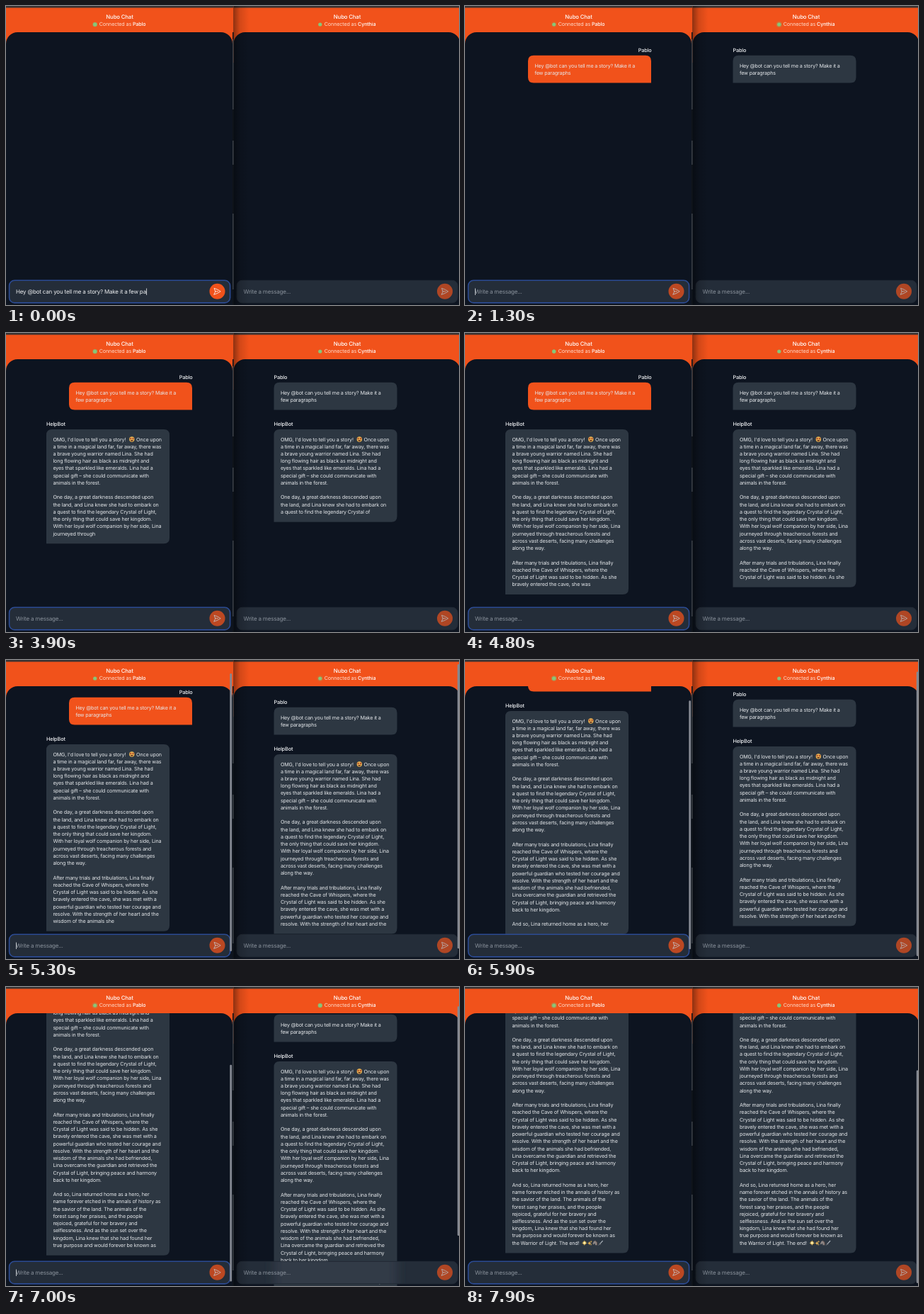
These frames come from a looping animation (640x422 px, 8000 ms). An HTML page:

```html
<!DOCTYPE html>
<html lang="en">
<head>
<meta charset="utf-8">
<title>Chat in two windows</title>
<style>
  html, body { margin: 0; width: 100%; height: 100%; overflow: hidden; background: #0d1420; }
  svg { display: block; width: 100vw; height: 100vh; }
  text { font-family: Inter, "Open Sans", sans-serif; letter-spacing: -.02em; white-space: pre; text-rendering: geometricPrecision; }
  .body { font-size: 7.17px; fill: #e6e9ec; }
  .name { font-size: 7.3px; font-weight: 500; fill: #f1f3f5; }
  .title { font-size: 7.8px; font-weight: 500; fill: #fff; text-anchor: middle; }
  .status { font-size: 7.2px; fill: #ffdccd; text-anchor: middle; }
  .status tspan { font-weight: 500; fill: #fff; }
  .field { font-size: 8px; letter-spacing: -.023em; }
</style>
</head>
<body>
<svg id="stage" viewBox="0 0 640 422" preserveAspectRatio="none">
  <defs>
    <clipPath id="pane"><path d="M0 53.4a16.4 16.4 0 0 1 16.4-16.4H303.6a16.4 16.4 0 0 1 16.4 16.4V422H0Z"/></clipPath>
    <clipPath id="input"><rect x="5.4" y="388" width="310.4" height="30.2" rx="7"/></clipPath>
    <filter id="blur"><feGaussianBlur stdDeviation="7"/></filter>
    <linearGradient id="shade">
      <stop offset="0" stop-color="#000" stop-opacity=".4"/>
      <stop offset=".4" stop-color="#000" stop-opacity=".13"/>
      <stop offset="1" stop-color="#000" stop-opacity="0"/>
    </linearGradient>
  </defs>
</svg>
<script>
const LOOP = 8000, FRAME = 100, LINE = 10.24, TOP = 136, PAD = 9, VIEW = 420;
const ORANGE = '#f1521b', GREY = '#2d3742', NIGHT = '#0d1420';
const BOT = 'HelpBot', ASKER = 'Pablo';
const PROMPT = 'Hey @bot can you tell me a story? Make it a few paragraphs';
const TYPED_AT_START = PROMPT.length - 8;
// An asterisk marks the place of drawn emoji.
const STORY = `OMG, I'd love to tell you a story! * Once upon
a time in a magical land far, far away, there was
a brave young warrior named Lina. She had
long flowing hair as black as midnight and
eyes that sparkled like emeralds. Lina had a
special gift – she could communicate with
animals in the forest.

One day, a great darkness descended upon
the land, and Lina knew she had to embark on
a quest to find the legendary Crystal of Light,
the only thing that could save her kingdom.
With her loyal wolf companion by her side, Lina
journeyed through treacherous forests and
across vast deserts, facing many challenges
along the way.

After many trials and tribulations, Lina finally
reached the Cave of Whispers, where the
Crystal of Light was said to be hidden. As she
bravely entered the cave, she was met with a
powerful guardian who tested her courage and
resolve. With the strength of her heart and the
wisdom of the animals she had befriended,
Lina overcame the guardian and retrieved the
Crystal of Light, bringing peace and harmony
back to her kingdom.

And so, Lina returned home as a hero, her
name forever etched in the annals of history as
the savior of the land. The animals of the
forest sang her praises, and the people
rejoiced, grateful for her bravery and
selflessness. And as the sun set over the
kingdom, Lina knew that she had found her
true purpose and would forever be known as
the Warrior of Light. The end! *`.split('\n').map(line => line.split(' ').filter(Boolean));

const stage = document.getElementById('stage');

function el(parent, tag, attrs = {}, content = '') {
  const node = document.createElementNS('http://www.w3.org/2000/svg', tag);
  for (const key in attrs) node.setAttribute(key, attrs[key]);
  node.textContent = content;
  return parent.appendChild(node);
}
const set = (node, key, value) => node.setAttribute(key, value);
const show = (node, on) => set(node, 'visibility', on ? 'visible' : 'hidden');
const label = (parent, cls, x, y, content = '', extra = {}) =>
  el(parent, 'text', { class: cls, x, y, ...extra }, content);
const rect = (parent, x, y, width, height, fill, extra = {}) =>
  el(parent, 'rect', { x, y, width, height, fill, ...extra });

function track(t, keys) {
  if (t <= keys[0][0]) return keys[0][1];
  for (let i = 1; i < keys.length; i++) {
    const [t0, v0] = keys[i - 1], [t1, v1] = keys[i];
    if (t <= t1) return v0 + (v1 - v0) * (t - t0) / (t1 - t0);
  }
  return keys[keys.length - 1][1];
}

// Rounded bubble with one square bottom corner on the speaker's side.
function bubble(x, y, w, h, squareRight) {
  const r = 8, br = squareRight ? 0 : r, bl = squareRight ? r : 0;
  return `M${x + r} ${y}h${w - 2 * r}q${r} 0 ${r} ${r}v${h - r - br}q0 ${br} ${-br} ${br}` +
    `h${-(w - br - bl)}q${-bl} 0 ${-bl} ${-bl}v${-(h - r - bl)}q0 ${-r} ${r} ${-r}Z`;
}

function starFace(parent) {
  const g = el(parent, 'g', { transform: 'translate(177.8 150)' });
  el(g, 'circle', { r: 3.7, fill: '#e9b552' });
  for (const x of [-1.7, 1.7]) el(g, 'circle', { cx: x, cy: -.9, r: 1.25, fill: '#b4542f' });
  el(g, 'path', { d: 'M-2.2 1H2.2Q1.6 3.1 0 3.1T-2.2 1Z', fill: '#713d27' });
  return g;
}

function endIcons(parent) {
  const g = el(parent, 'g', { transform: `translate(168.8 ${150 + 36 * LINE})` });
  const star = r => `M0 ${-r}L${r * .28} ${-r * .28} ${r} 0 ${r * .28} ${r * .28} 0 ${r} ${-r * .28} ${r * .28} ${-r} 0 ${-r * .28} ${-r * .28}Z`;
  el(g, 'path', { d: star(3.8), fill: '#f6d76c' });
  el(g, 'path', { d: star(3.3), fill: '#efb443', transform: 'rotate(45)' });
  el(g, 'circle', { r: 1.4, fill: '#fff0b3' });
  for (const [x, y, r] of [[7, .4, 2.8], [9.3, -2, 1.5], [9.2, 2.4, 1.3]])
    el(g, 'path', { d: star(r), fill: '#e8b455', transform: `translate(${x} ${y})` });
  el(g, 'path', { d: 'M11.6 1.5L12.7-1.8 15-3.2 17.5-1.3 18 3H15.2L14.8.6 12.6 2.2Z', fill: '#8c8584' });
  el(g, 'path', { d: 'M15-3L17.6-.8 17.8 3', fill: 'none', stroke: '#6c5750', 'stroke-width': 1 });
  el(g, 'path', { d: 'M21.2 2L25.8-3.2', stroke: '#b8c0c7', 'stroke-width': 1.1 });
  el(g, 'path', { d: 'M20.6.4L22.9 2.3M19.6 3.2L21.2 2', stroke: '#77777c', 'stroke-width': 1 });
  return g;
}

function makePane(opts) {
  const g = el(stage, 'g', { transform: `translate(${opts.x} 0)` });
  rect(g, 0, 0, 321.5, 80, ORANGE);
  rect(g, 0, 0, 321.5, 2.5, '#3a3333');
  label(g, 'title', 160.5, 17.7, 'Nubo Chat');
  const status = label(g, 'status', 164.6, 28.4, 'Connected as ');
  el(status, 'tspan', {}, opts.user);
  const dotX = 158.6 - status.getComputedTextLength() / 2;
  const ping = el(g, 'circle', { cx: dotX, cy: 26, fill: '#6fd08a' });
  el(g, 'circle', { cx: dotX, cy: 26, r: 2.6, fill: '#86c779' });

  const clip = el(g, 'g', { 'clip-path': 'url(#pane)' });
  rect(clip, 0, 37, 320, 385, NIGHT);
  const page = el(clip, 'g');

  const ask = el(page, 'g'), askX = opts.own ? 89 : 57;
  label(ask, 'name', opts.own ? 263.5 : 57, 64.6, ASKER, { 'text-anchor': opts.own ? 'end' : 'start' });
  el(ask, 'path', { d: bubble(askX, 69.7, 174, 38.7, opts.own), fill: opts.own ? ORANGE : GREY });
  const breakAt = PROMPT.indexOf('few');
  [PROMPT.slice(0, breakAt - 1), PROMPT.slice(breakAt)].forEach((part, i) =>
    label(ask, 'body', askX + 9.4, 86.6 + i * LINE, part));

  const reply = el(page, 'g');
  label(reply, 'name', 57, 130.6, BOT);
  const box = el(reply, 'path', { fill: GREY });
  const lines = STORY.map((_, i) => label(reply, 'body', 66.4, 152.5 + i * LINE));
  const tail = label(reply, 'body', 182.2, 152.5);
  const icons = { 0: starFace(reply), [STORY.length - 1]: endIcons(reply) };

  rect(g, 4.6, 387.3, 312, 31.6, '#242d39', {
    rx: 7.5, stroke: opts.own ? '#2c4b93' : '#222a35', 'stroke-width': opts.own ? 1.6 : 1 });
  // The reply shows softly through the input as it passes beneath.
  const glass = el(g, 'g', { 'clip-path': 'url(#input)' });
  const ghost = el(glass, 'path', { fill: '#313b46', filter: 'url(#blur)' });
  const field = label(g, 'field', 14, 406);
  const caret = rect(g, 14, 398.5, .8, 9.5, '#e8eaed');
  const button = el(g, 'g', { transform: 'translate(298.5 402.8)' });
  el(button, 'circle', { r: 11, fill: ORANGE });
  el(button, 'path', { d: 'M-2.9 0L-4.4-4.4Q.6-3 4.7 0 .6 3-4.4 4.4ZH1', fill: 'none',
    stroke: '#fff', 'stroke-width': .8, 'stroke-linejoin': 'round', 'stroke-linecap': 'round' });
  const thumb = rect(g, 316.3, 0, 2.8, 0, '#858992', { rx: 1.4 });

  function drawReply(count) {
    let left = count, rows = 1;
    for (const icon of Object.values(icons)) show(icon, false);
    STORY.forEach((words, i) => {
      const taken = words.slice(0, Math.max(0, left));
      left -= words.length;
      if (taken.length) rows = i + 1;
      const [head, rest] = taken.join(' ').split('*');
      lines[i].textContent = head;
      if (rest !== undefined && icons[i]) show(icons[i], true);
      if (i === 0) tail.textContent = (rest || '').trim() && ' ' + rest.trim();
    });
    if (!count) lines[0].textContent = '...';
    const first = tail.textContent ? 116.2 + tail.getComputedTextLength() : lines[0].getComputedTextLength();
    const width = rows > 1 ? 174 : Math.max(24, Math.min(174, first + 18.8));
    const shape = bubble(57, TOP, width, 2 * PAD + rows * LINE, false);
    set(box, 'd', shape);
    set(ghost, 'd', shape);
    return rows;
  }

  return t => {
    const typing = opts.own && t < opts.askAt;
    field.textContent = typing ? PROMPT.slice(0, TYPED_AT_START + Math.floor(t / 100)) : 'Write a message...';
    set(field, 'fill', typing ? '#eef0f2' : '#89919b');
    set(caret, 'x', typing ? 14.3 + field.getComputedTextLength() : 14);
    show(caret, opts.own && (typing || t % 1000 < 500));
    set(button, 'opacity', typing ? 1 : opts.own ? .74 : .68);

    show(ask, t >= opts.askAt);
    set(reply, 'display', t >= opts.replyAt ? 'inline' : 'none');
    const rows = drawReply(Math.floor(track(t, opts.words) + .001));
    const scroll = track(t, opts.scroll);
    const bottom = TOP + 2 * PAD + rows * LINE;
    set(page, 'transform', `translate(0 ${-scroll})`);
    set(ghost, 'transform', `translate(0 ${-scroll})`);
    show(ghost, bottom - scroll > 388);

    const height = VIEW + Math.max(0, bottom - 375.5);
    set(thumb, 'y', 3 + scroll / height * VIEW);
    set(thumb, 'height', VIEW * VIEW / height - 5);
    show(thumb, opts.bar.some(([from, to]) => t >= from && t < to));

    const phase = (t / 975 + opts.ping) % 1;
    const grow = 1 - (1 - Math.min(1, phase / .75)) ** 3;
    set(ping, 'r', 2.6 * (1 + grow));
    set(ping, 'opacity', .75 * (1 - grow));
  };
}

const panes = [
  makePane({
    x: 0, own: true, user: ASKER, askAt: 1000, replyAt: 1500, ping: .08,
    words: [[2000, 0], [2500, 27], [3900, 102], [5300, 168], [6500, 226], [7000, 252], [7200, 259]],
    scroll: [[4900, 0], [5300, 17], [6500, 111], [7000, 144], [7400, 157.4]],
    bar: [[4900, 7800]]
  }),
  makePane({
    x: 321.5, own: false, user: 'Cynthia', askAt: 1200, replyAt: 1700, ping: .9,
    words: [[2600, 0], [3900, 82], [5200, 163], [6800, 163], [6900, 222], [7500, 259]],
    scroll: [[5200, 0], [5300, 3], [5600, 14], [6800, 14], [7000, 31], [7200, 80], [7400, 126], [7600, 150], [7800, 157.4]],
    bar: [[5200, 6200], [6800, LOOP]]
  })
];

// Gap between the two windows, with the shadow it casts.
rect(stage, 321.5, 0, 22, 422, 'url(#shade)');
rect(stage, 320, 37, 1.6, 385, '#10141a');
for (const [y, h] of [[47, 99], [190, 34], [293, 107]]) rect(stage, 320.3, y, 1.1, h, '#4d5258');

const start = performance.now();
function frame() {
  const now = (performance.now() - start) % LOOP;
  const t = Math.floor(now / FRAME) * FRAME;
  panes.forEach(draw => draw(t));
  requestAnimationFrame(frame);
}
frame();
</script>
</body>
</html>
```
